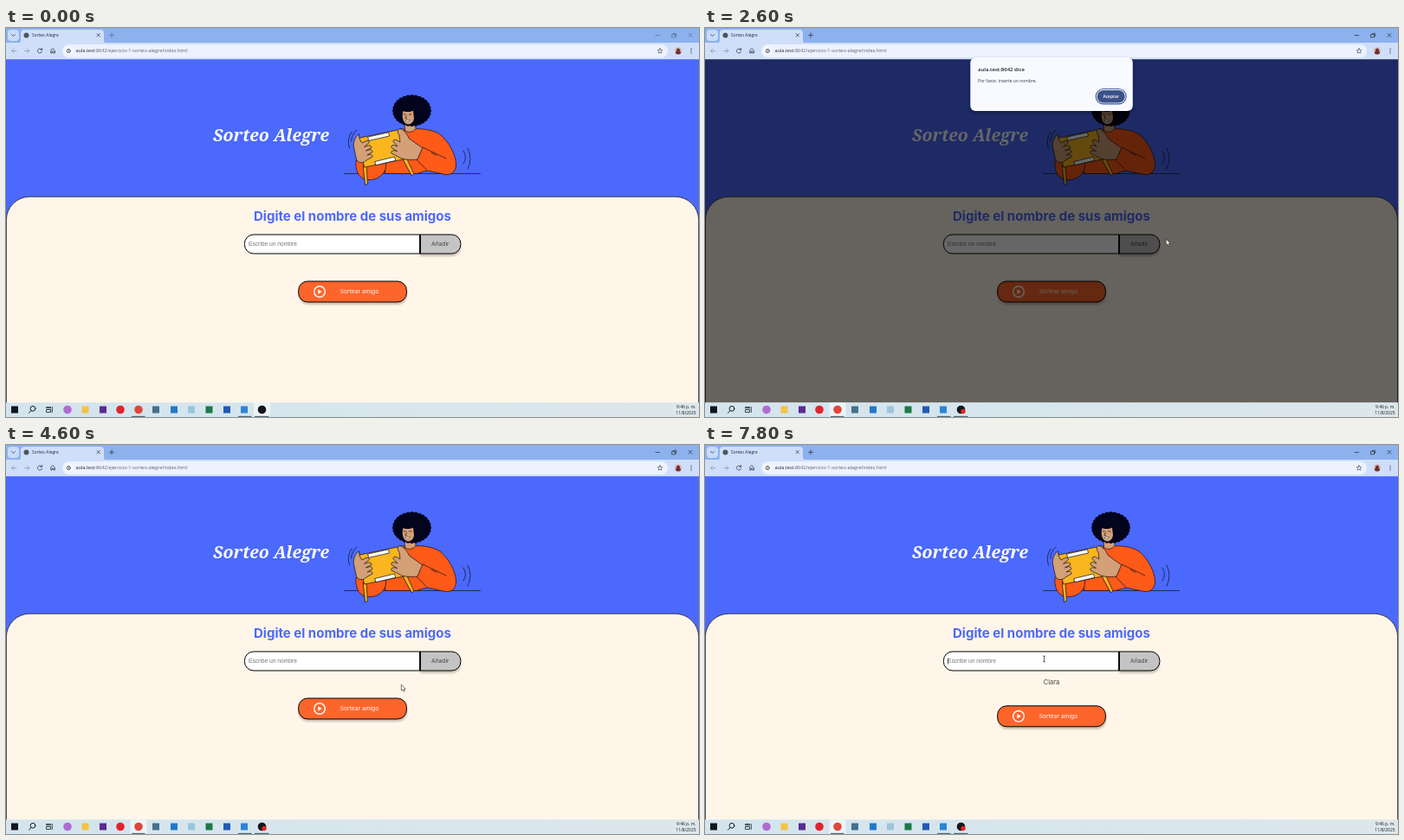
Recreate the animation shown at these times as an HTML page. Size 800 by 450 pixels, loop 8 s.

```html
<!DOCTYPE html>
<html lang="es">
<head>
<meta charset="utf-8">
<title>Sorteo Alegre</title>
<style>
html, body { margin: 0; width: 100%; height: 100%; overflow: hidden; background: #4b69fd; }
svg { display: block; width: 800px; height: 450px; }
text { white-space: pre; }
.ui { font-family: "Open Sans", "Noto Sans", sans-serif; }
.inter { font-family: Inter, Roboto, sans-serif; }
.field { font-family: "Liberation Sans", sans-serif; font-size: 6.67px; }
.mid { text-anchor: middle; }
.line { fill: none; stroke: #333b48; stroke-width: .8; stroke-linecap: round; stroke-linejoin: round; }
.ink { stroke: #11101c; stroke-width: .7; stroke-linejoin: round; stroke-linecap: round; }
.skin { fill: #d3a077; }
.shirt { fill: #fe5a18; }
.wood { fill: #f9b61f; }
</style>
</head>
<body>
<svg viewBox="0 0 800 450" xmlns="http://www.w3.org/2000/svg">
  <defs>
    <linearGradient id="barFill"><stop offset="0" stop-color="#d3e4ee"/><stop offset="1" stop-color="#dce7eb"/></linearGradient>
    <filter id="soft" x="-20%" y="-40%" width="140%" height="200%"><feGaussianBlur stdDeviation="1"/></filter>
    <filter id="softer" x="-10%" y="-20%" width="120%" height="150%"><feGaussianBlur stdDeviation="2"/></filter>
  </defs>

  <!-- page -->
  <rect y="36" width="800" height="398" fill="#4b69fd"/>
  <text x="306" y="131" class="mid" font-family="'Noto Serif', serif" font-size="19.500" font-weight="700" font-style="italic" fill="#fff">Sorteo Alegre</text>

  <g id="art">
    <path class="ink" fill="none" d="M390.500 168.500H547.500"/>
    <path class="ink shirt" d="M460 118C476 115 492 117 501 123C511 131 519 146 519.500 157C520 166 514 170.500 507 169.500L486 165L474 168.500H438L434 141Z"/>
    <path class="ink shirt" d="M404 154C403 163 406 172 414 175C424 177.500 434 173 438 164L439 155L424 150Z"/>
    <path class="ink skin" d="M460 107L460.500 118C463 121.500 470 121 473 116.500L472 104Z"/>
    <g id="hair" fill="#03041d"></g>
    <path class="skin" d="M458.500 96C462 98 467 97 470 95.500L471 104C470.500 110.500 465 113 461.500 110.500C457.500 107.500 457 101 458.500 96Z"/>
    <path class="ink" fill="none" stroke-width=".6" d="M459.300 100L461.200 99.600M465.500 100L468 100M462.300 101L461 104.300L462.700 104.700"/>
    <path d="M461 106.500Q464 107.600 466.500 106.200Q465 109.600 462 108.600Z" fill="#fff" stroke="#11101c" stroke-width=".4"/>
    <path class="ink wood" d="M412.500 159L416 158.500L417.500 180.500L414.800 181.500ZM458 151L462 149.500L471 169L468.500 170.500Z"/>
    <path class="ink wood" d="M406.500 127.500L459 116.500L468.500 150L414 161Z"/>
    <path class="ink" fill="#fff" d="M418 126L441.500 120.800L442.500 125L419 130.300ZM426 154.500L448.500 149L449.700 153.300L427.300 158.600Z"/>
    <path class="ink skin" d="M407 123C403 126 400.500 132 401.500 138L404.500 152C407 157 413 156.500 416 153L423 149C423.500 146.500 421 145.500 417 147L423 143.500C423 140.500 420.500 140 415.500 142L422 138.500C422 135.500 419 135 413.500 137.500L419.500 132.500C419 129.500 416 130 411 133L408.500 129Z"/>
    <path class="ink skin" d="M455 116.500C460 118 463 123 465.500 128L481 139L475.500 152C467 153 458 152.500 453 149L445 145C444 142 447 141 451.500 142.500L445 138.500C444 135.500 447 134.500 452 137L447 131.500C447 128.500 450 128.500 455 132L454 124C451 120 452 116.500 455 116.500Z"/>
    <path class="shirt" d="M481 138L507 151C500 156 492 159 486 165L474.500 153Z"/>
    <path class="ink" fill="none" d="M508 151L481 138L474.500 153L486 164.500M491 144L497 147.500"/>
    <path class="ink" fill="none" d="M399 120Q393 129 396.500 139M405 118Q399 123 398.500 131M528 142Q533 150 528 157M533 139Q539 151 533 163"/>
  </g>

  <path d="M.4 434V222.200A27 27 0 0 1 27.400 195.200H772.600A27 27 0 0 1 799.600 222.200V434" fill="#fff6e9" stroke="#222" stroke-width=".8"/>
  <text x="400" y="222.500" class="inter mid" font-size="15" font-weight="700" fill="#4b69fd">Digite el nombre de sus amigos</text>

  <path d="M478 241H515A10 10 0 0 1 525 251V254A10 10 0 0 1 515 264H478Z" fill="#000" opacity=".22" filter="url(#soft)"/>
  <path d="M478 239H514.500A10.400 10.400 0 0 1 524.900 249.400V250.600A10.400 10.400 0 0 1 514.500 261H478Z" id="addBtn" stroke="#000" stroke-width="1"/>
  <path d="M478 239H285.800A10.400 10.400 0 0 0 275.400 249.400V250.600A10.400 10.400 0 0 0 285.800 261H478Z" fill="#fff" stroke="#000" stroke-width="1"/>
  <path d="M478 239V261" stroke="#000" stroke-width="1.700"/>
  <text x="501.300" y="252.400" class="inter mid" font-size="6.670" fill="#444">Añadir</text>
  <text id="hint" x="280" y="252.300" class="field" fill="#757575">Escribe un nombre</text>
  <text id="typed" x="280" y="252.300" class="field" fill="#111"></text>
  <rect id="caret" y="246.500" width=".6" height="7" fill="#000"/>
  <text id="entry" x="400" y="276.600" class="inter mid" font-size="7.500" fill="#444">Clara</text>

  <g id="draw">
    <rect x="338" y="295" width="125" height="25" rx="10.400" fill="#000" opacity=".22" filter="url(#soft)"/>
    <rect x="337.700" y="293" width="124.700" height="24" rx="10.400" fill="#fe652b" stroke="#000" stroke-width="1"/>
    <circle cx="362" cy="305" r="6.300" fill="none" stroke="#fff" stroke-width="1.400"/>
    <path d="M360.300 302.200V307.800L364.800 305Z" fill="#fff"/>
    <text x="408" y="307.400" class="inter mid" font-size="6.670" fill="#fff">Sortear amigo</text>
  </g>
  <rect id="dim" y="36" width="800" height="397.500" fill="#000" opacity=".6"/>

  <!-- browser frame -->
  <rect width="800" height="18" fill="#8cb1ed"/>
  <rect x="2" y="2" width="13" height="13" rx="4" fill="#c8dbfa"/>
  <path class="line" d="M6.500 7.500L8.500 9.500L10.500 7.500"/>
  <path d="M13 18Q17 18 17 14V6Q17 2 21 2H109Q113 2 113 6V14Q113 18 117 18Z" fill="#cfdffa"/>
  <circle cx="23.500" cy="8.500" r="3" fill="#4d535c"/>
  <text x="30" y="10.400" class="ui" font-size="4.900" fill="#202530">Sorteo Alegre</text>
  <path class="line" d="M105 6.500L108.500 10M108.500 6.500L105 10"/>
  <g id="controls">
    <path class="line" d="M119.500 8.300H124.500M122 5.800V10.800M750 8.500H754.500M769 7.500H772.500V10.800H769ZM770.300 7.300V6.300H773.700V9.500H772.700M788 6.300L792 10.300M792 6.300L788 10.300"/>
  </g>
  <rect y="17" width="800" height="19.200" fill="#cfdffa"/>
  <path class="line" style="stroke:#8e9aad" d="M12 26.500H6.500M9 24L6.500 26.500L9 29M21.500 26.500H27M24.500 24L27 26.500L24.500 29"/>
  <path class="line" d="M41.300 25A2.600 2.600 0 1 0 41.500 27.500M41.600 23.500V25.300H39.700M51.800 26V29H53.300V27H54.900V29H56.400V26L54.100 23.800Z"/>
  <rect x="65" y="19" width="699" height="15.300" rx="7.600" fill="#ecf2fe"/>
  <circle cx="72.300" cy="26.500" r="4.700" fill="#fff"/>
  <circle class="line" cx="72.300" cy="26.500" r="2.200"/>
  <path class="line" d="M72.300 26.300V27.500M72.300 25.200V25.300"/>
  <text x="80.500" y="28.400" class="ui" font-size="5.500" fill="#5b6371"><tspan fill="#1d222b">aula.test</tspan>:8642/ejercicio-1-sorteo-alegre/index.html</text>
  <path class="line" style="stroke-width:.6" d="M755 23.600L755.900 25.500L757.900 25.700L756.400 27.100L756.800 29.100L755 28.100L753.200 29.100L753.600 27.100L752.100 25.700L754.100 25.500Z"/>
  <circle cx="776" cy="26.500" r="4.200" fill="#d9b9b0"/>
  <path d="M773 29.400Q773 26.800 774.300 26.600A2 2 0 1 1 777.700 26.600Q779 26.800 779 29.400Q776 31.500 773 29.400Z" fill="#6b3038"/>
  <path d="M791 24.200v.1M791 26.500v.1M791 28.800v.1" stroke="#333b48" stroke-width="1.300" stroke-linecap="round"/>

  <!-- alert -->
  <g id="alert">
    <rect x="306" y="36" width="188" height="62" rx="6" fill="#000" opacity=".3" filter="url(#softer)"/>
    <rect x="306.300" y="34" width="187.500" height="62" rx="6" fill="#f8faff"/>
    <text x="315" y="50.300" class="ui" font-size="6" font-weight="600" fill="#1f2127">aula.test:8642 dice</text>
    <text x="315" y="62.600" class="ui" font-size="4.950" fill="#33363d">Por favor, inserte un nombre.</text>
    <rect id="ring" x="451.200" y="70.500" width="35" height="17.400" rx="8.700" fill="#fff" stroke="#3c5ba0" stroke-width="1.100"/>
    <rect id="okBtn" x="452.700" y="72" width="32" height="14.500" rx="7.200"/>
    <text x="468.700" y="81.200" class="ui mid" font-size="4.950" font-weight="600" fill="#fff">Aceptar</text>
  </g>

  <!-- taskbar -->
  <rect y="433.300" width="800" height="16.700" fill="url(#barFill)"/>
  <rect id="active" y="433.300" width="19" height="16.700" fill="#ecf4f7"/>
  <g id="icons"></g>
  <g class="line" style="stroke:#151a20;stroke-width:1">
    <circle cx="31" cy="440.300" r="2.900"/><path d="M29 442.600L26.500 445.300"/>
    <path style="stroke-width:.8" d="M47 438.500H51.500V439.800H47ZM47 441.500H51.500V444.500H47ZM53.300 438.500V444.500"/>
  </g>
  <path d="M145 449.400H160.500M268 449.400H283.500M287 449.400H303.500" stroke="#3d5a68" stroke-width="1"/>
  <circle id="rec" cx="298" cy="443.500" r="2.700" fill="#e3261f"/>
  <g class="ui" font-size="4.900" text-anchor="end" fill="#15191f"><text x="796.500" y="439.700">9:46 p. m.</text><text x="796.500" y="447.300">11/8/2025</text></g>

  <!-- pointers -->
  <path id="arrow" d="M0 0V7L1.700 5.600L2.800 8L4 7.400L2.900 5.100H5Z" fill="#fff" stroke="#222" stroke-width=".6"/>
  <path id="hand" d="M-.8 .6Q0 -.6 .8 .6V3.500L4 4.200Q5.200 4.600 5 6L4.300 9.300H-.4L-2.900 5.800Q-2.700 4.600 -1.600 5.300L-.8 6Z" fill="#fff" stroke="#222" stroke-width=".6"/>
  <path id="beam" d="M-1.500 -3.500Q0 -3.500 0 -2.800V2.800Q0 3.500 -1.500 3.500M1.500 -3.500Q0 -3.500 0 -2.800M0 2.800Q0 3.500 1.500 3.500" fill="none" stroke="#222" stroke-width=".7"/>
</svg>
<script>
const LOOP = 8000;
const $ = id => document.getElementById(id);
const set = (id, attrs) => { for (const k in attrs) $(id).setAttribute(k, attrs[k]); };
const show = (id, on) => set(id, { visibility: on ? "visible" : "hidden" });
const clamp = v => Math.max(0, Math.min(1, v));

function add(parent, tag, attrs) {
  const el = document.createElementNS("http://www.w3.org/2000/svg", tag);
  for (const k in attrs) el.setAttribute(k, attrs[k]);
  $(parent).append(el);
}

// curly hair: an ellipse edged with small lobes
add("hair", "ellipse", { cx: 468.5, cy: 95.5, rx: 21, ry: 17 });
for (let i = 0; i < 28; i++) {
  const a = i / 28 * Math.PI * 2;
  add("hair", "circle", { cx: 468.5 + 19.8 * Math.cos(a), cy: 95.5 + 15.8 * Math.sin(a), r: 2.6 });
}

// taskbar apps: x, colour, round
[[10, "#12161c"], [71, "#b06bd0", 1], [91.5, "#f4c343"], [112, "#5a2a91"], [132, "#e0232e", 1],
 [153, "#e0473a", 1], [173, "#45708c"], [194, "#2278c8"], [214, "#9cc5da"], [234.5, "#1c7a45"],
 [255, "#2259b5"], [275, "#2b84d6"], [295.5, "#15161a", 1]
].forEach(([x, fill, round]) => round
  ? add("icons", "circle", { cx: x, cy: 441.5, r: 4.8, fill })
  : add("icons", "rect", { x: x - 4, y: 437.5, width: 8, height: 8, fill }));

// pointer keys: time, x, y
const path = [
  [500, 776, 442], [700, 560, 330], [900, 112, 198], [1100, 300, 232], [1300, 500, 252], [1400, 502.5, 254],
  [2550, 502.5, 254], [2700, 590, 225], [2900, 760, 160], [3100, 620, 105], [3300, 428, 80], [3400, 455, 82],
  [3600, 455, 82], [3900, 468, 150], [4300, 508, 303], [4500, 490, 292], [4800, 390, 248], [4900, 380.5, 242],
  [6450, 380.5, 242], [6800, 492, 250], [7050, 500, 251], [7300, 430, 250], [7700, 391.5, 247.5], [8000, 391.5, 247.5]
];
function pointer(t) {
  let i = 1;
  while (i < path.length - 1 && path[i][0] < t) i++;
  const [t0, x0, y0] = path[i - 1], [t1, x1, y1] = path[i];
  const p = clamp((t - t0) / (t1 - t0));
  return [x0 + (x1 - x0) * p, y0 + (y1 - y0) * p];
}

const NAME = "Clara";
const keyTimes = [5200, 5500, 5800, 6000, 6150];
const ADDED = 7000, OPEN = 1800, CLOSE = 3600;

function render(t) {
  const [x, y] = pointer(t);
  const modal = t >= OPEN && t < CLOSE;
  const inRow = y > 238.5 && y < 261.5;
  const overAdd = inRow && x > 478 && x < 525;
  const overField = inRow && x > 275 && x <= 478;

  // window focus
  set("controls", { opacity: t < 100 ? .5 : 1 });
  set("active", { x: t < 100 ? 286 : 143.5 });
  show("rec", t >= 200);

  // form
  const text = t < ADDED ? NAME.slice(0, keyTimes.filter(k => t >= k).length) : "";
  $("typed").textContent = text;
  show("hint", !text);
  set("caret", { x: 280 + (text ? $("typed").getComputedTextLength() : 0) });
  show("caret", t >= 4850 && t < ADDED || t >= 7400);
  set("addBtn", { fill: overAdd && t >= 500 ? "#9f9f9f" : "#c4c4c4" });
  show("entry", t >= ADDED);
  set("draw", { transform: `translate(0 ${t >= ADDED ? 8.8 : 0})` });

  // alert
  show("dim", modal);
  const enter = clamp((t - OPEN) / 200);
  const leave = clamp((t - CLOSE) / 150);
  const dy = t < CLOSE ? -6 * (1 - enter) : -2 - 5 * leave;
  show("alert", t >= OPEN && leave < 1);
  set("alert", { transform: `translate(0 ${dy})`, opacity: t < CLOSE ? .2 + .8 * enter : 1 - leave });
  show("ring", modal);
  const overOk = x > 451 && x < 487 && y > 70 && y < 88;
  set("okBtn", { fill: overOk && modal ? "#4667a6" : "#3b5188" });

  // pointer
  const kind = overAdd ? "hand" : overField && !modal ? "beam" : "arrow";
  for (const id of ["arrow", "hand", "beam"]) {
    show(id, t >= 500 && id === kind);
    set(id, { transform: `translate(${x} ${y})` });
  }
}

const start = performance.now();
function tick(now) {
  render(Math.max(0, now - start) % LOOP);
  requestAnimationFrame(tick);
}
render(0);
requestAnimationFrame(tick);
</script>
</body>
</html>
```
